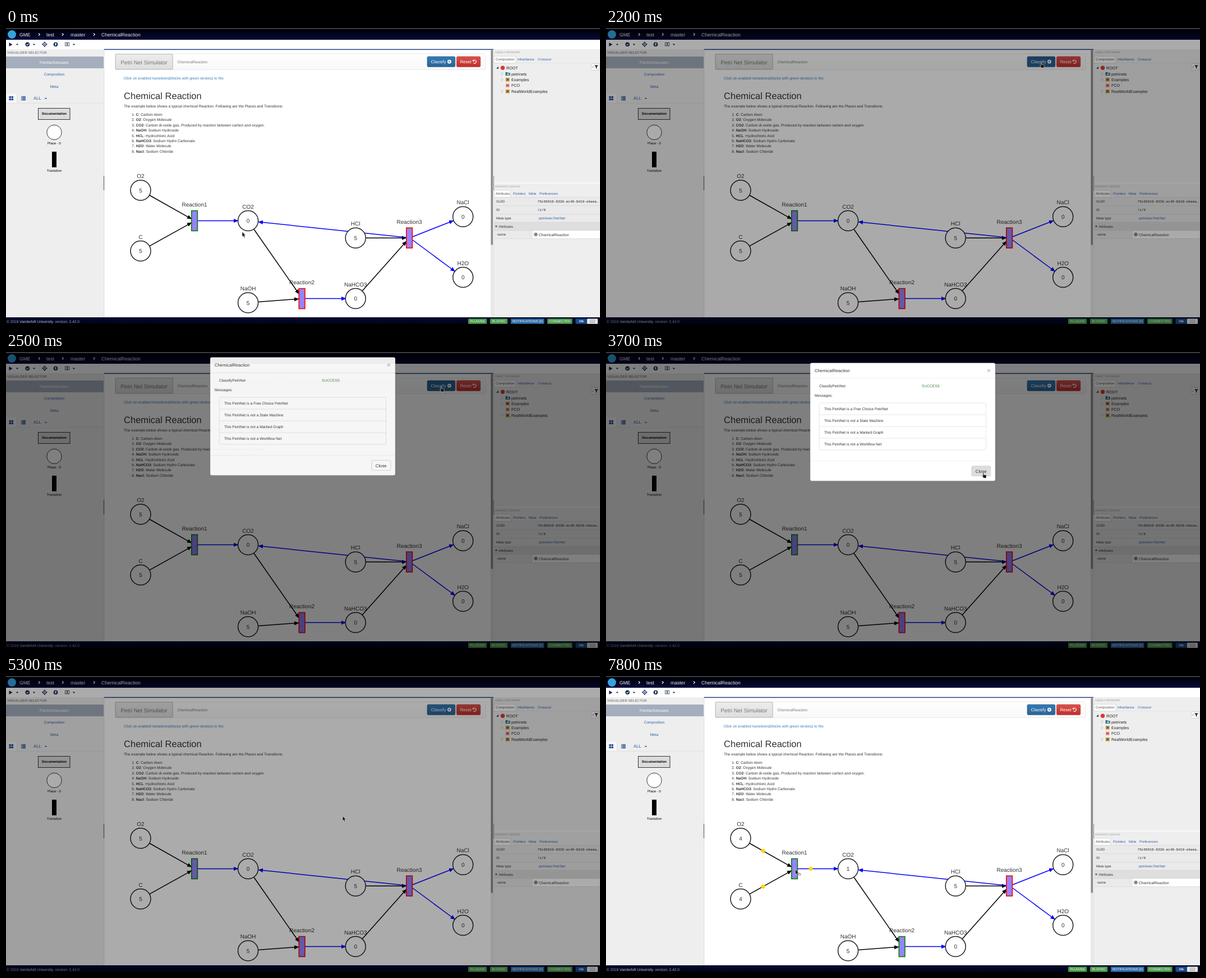
These frames come from a looping animation (1059 by 529 pixels, 8000 ms). An HTML page:

```html
<!DOCTYPE html>
<html lang="en">
<head>
<meta charset="utf-8">
<title>Petri net simulator</title>
<style>
html, body { margin: 0; width: 100%; height: 100%; overflow: hidden; background: #fff; }
svg { display: block; font-family: "Liberation Sans", Arial, sans-serif; text-rendering: geometricPrecision; }
text { white-space: pre; }
</style>
</head>
<body>
<svg id="stage" width="1059" height="529" viewBox="0 0 1059 529"></svg>
<script>
const BASE = 6.62, SMALL = 6.07, MID = 7.72, TREE = 7.17, BIG = 8.6, LABEL = 10;
const NAVY = '#0c2556', LINK = '#2f5fa8', TEXT = '#333';

// y is the middle of the capitals
const text = (x, y, s, size = BASE, fill = TEXT, extra = '') =>
  `<text x="${x}" y="${y + size * .35}" font-size="${size}" fill="${fill}" ${extra}>${s}</text>`;
const mid = (x, y, s, size, fill, extra = '') =>
  text(x, y, s, size, fill, 'text-anchor="middle" ' + extra);
const rect = (x, y, w, h, fill, extra = '') =>
  `<rect x="${x}" y="${y}" width="${w}" height="${h}" fill="${fill}" ${extra}/>`;
const circle = (x, y, r, fill, extra = '') =>
  `<circle cx="${x}" cy="${y}" r="${r}" fill="${fill}" ${extra}/>`;
const path = (d, fill, extra = '') => `<path d="${d}" fill="${fill}" ${extra}/>`;
const stroke = (d, color, width = 1) => path(d, 'none', `stroke="${color}" stroke-width="${width}"`);
const caret = (x, y, color = NAVY) => path(`M${x - 2.2} ${y - 1}h4.4l-2.2 2.4z`, color);
const bold = 'font-weight="bold"';

const gradient = (id, a, b) =>
  `<linearGradient id="${id}" x2="0" y2="1"><stop stop-color="${a}"/><stop offset="1" stop-color="${b}"/></linearGradient>`;
const marker = (id, color) =>
  `<marker id="${id}" markerUnits="userSpaceOnUse" markerWidth="9" markerHeight="8" refX="8" refY="4" orient="auto"><path d="M0 .4L8.4 4L0 7.6z" fill="${color}"/></marker>`;

const defs = '<defs>' + gradient('bar', '#000', '#05093a') + gradient('foot', '#05082f', '#000418') +
  gradient('blue', '#337ab7', '#2a6496') + gradient('red', '#d9534f', '#c12e2a') +
  gradient('brand', '#ececec', '#dedede') + gradient('nav', '#fff', '#f8f8f8') +
  marker('black', '#000') + marker('blueTip', '#00f') + '</defs>';

function header() {
  let s = rect(0, 0, 1059, 21, 'url(#bar)') + rect(0, 0, 1059, 2, '#373c3e') + circle(10.5, 11.5, 7.5, '#35a4dc');
  [[24, 'GME'], [72, 'test'], [115, 'master'], [170, 'ChemicalReaction']]
    .forEach(([x, w]) => s += text(x, 11.5, w, BIG, '#eee'));
  [58, 100, 156].forEach(x => s += stroke(`M${x} 9.3l2.3 2.3l-2.3 2.3`, '#fff', 1.2));
  s += path('M5.5 26v7l6-3.5z', NAVY) + circle(38.3, 29.2, 3.8, NAVY) +
    stroke('M36.3 29.2l1.5 1.6l2.6-3', '#fff', 1.1) +
    path('M68.8 25l1.7 2.4l2.4 1.7l-2.4 1.7l-1.7 2.4l-1.7-2.4l-2.4-1.7l2.4-1.7z', 'none', `stroke="${NAVY}" stroke-width="1.2"`) +
    circle(68.8, 29.1, 1, NAVY) + circle(88.5, 29.2, 3.8, NAVY) +
    path('M88.5 26.6l2.3 2.6h-1.5v2.2h-1.6v-2.2h-1.5z', '#fff') +
    stroke('M105.5 26h3v6h-3zM109.7 26h3v6h-3z', '#39445c', .9);
  [20, 50, 121].forEach(x => s += caret(x, 29.5));
  [30, 60, 79, 99].forEach(x => s += rect(x - 1.5, 23, .6, 13, '#eee'));
  return s;
}

function sidebar() {
  let s = rect(0, 38, 174, 479, '#eee') + text(2, 44.2, 'VISUALIZER SELECTOR', SMALL, '#888', bold) +
    rect(0, 51, 174, 21, '#a5aebd') + mid(86, 61.3, 'PetriNetSimulator', BASE, '#fff') +
    mid(86, 83, 'Composition', BASE, LINK) + mid(86, 104.5, 'Meta', BASE, LINK) +
    rect(0, 117, 19, 17, '#f6f6f6') + rect(19, 117, .6, 17, '#ddd') + rect(0, 134, 174, .6, '#ddd');
  for (const x of [5.5, 9.6]) for (const y of [122, 126]) s += rect(x, y, 3.4, 3.2, '#1d4a94');
  for (let i = 0; i < 4; i++) s += rect(27, 122 + i * 2, 1.4, 1.3, '#1d4a94') + rect(29, 122 + i * 2, 6, 1.3, '#1d4a94');
  return s + text(49, 125.7, 'ALL', MID, LINK) + caret(71, 126, LINK) +
    rect(57.5, 143.5, 56.5, 20, '#dcdcdc', 'stroke="#333"') + mid(86, 153.3, 'Documentation', SMALL, '#000', bold) +
    circle(86, 186.5, 13.2, '#fff', 'stroke="#222" stroke-width=".9"') + mid(86, 206.3, 'Place - 0', SMALL, '#000') +
    rect(82, 221, 8, 28, '#000') + mid(86, 255, 'Transition', SMALL, '#000');
}

function content() {
  const items = ['C: Carbon Atom', 'O2: Oxygen Molecule', 'CO2: Carbon di-oxide gas, Produced by reaction between carbon and oxygen.',
    'NaOH: Sodium Hydroxide', 'HCL: Hydrochloric Acid', 'NaHCO3: Sodium Hydro Carbonate', 'H2O: Water Molecule', 'Nacl: Sodium Chloride'];
  let s = rect(174, 38, 696, 479, '#e4e4e4') + rect(175.5, 38, 693, 479, '#fff') + rect(175, 37.6, 694, 1.5, '#1f4584') +
    rect(864, 39, 5, 478, '#e8e8e8') + rect(864.6, 39.5, 3.4, 348, '#8b8b8b') +
    rect(173.7, 264, 1.6, 26, '#888') + rect(869, 264, 1.6, 26, '#888') +
    rect(195, 46.5, 660, 28, 'url(#nav)', 'rx="2" stroke="#e3e3e3" stroke-width=".7"') +
    rect(195.2, 46.7, 102, 27.2, 'url(#brand)', 'stroke="#aaa" stroke-width=".8" rx="1"') +
    text(204.5, 61.2, 'Petri Net Simulator', 9.93, '#777') + text(305.5, 60.2, 'ChemicalReaction', BASE, '#777') +
    rect(751, 51, 49.8, 18.4, 'url(#blue)', 'id="classify" rx="2" stroke="#245580" stroke-width=".6"') +
    text(757.5, 60.2, 'Classify', MID, '#fff') + circle(790.4, 60.2, 3.4, '#fff') + path('M789.4 58.3v3.8l2.7-1.9z', '#2d6ca2') +
    rect(803.4, 51, 42.4, 18.4, 'url(#red)', 'rx="2" stroke="#b92c28" stroke-width=".6"') +
    text(809.5, 60.2, 'Reset', MID, '#fff') + stroke('M833.2 58.3a2.9 2.9 0 1 1 .2 4.2', '#fff', 1.1) + path('M832 56.6v3.2h3.1z', '#fff') +
    text(210, 90, 'Click on enabled transitions(blocks with green strokes) to fire.', BASE, '#337ab7') +
    text(210, 121, 'Chemical Reaction', 16.55) +
    text(210, 139.8, 'The example below shows a typical chemical Reaction. Following are the Places and Transitions:');
  items.forEach((item, i) => {
    const [name, rest] = item.split(':'), y = 154.6 + i * 9.41;
    s += text(229.8, y, i + 1 + '.', BASE, TEXT, 'text-anchor="end"') +
      text(231.8, y, `<tspan ${bold}>${name}</tspan>:${rest}`);
  });
  return s;
}

const places = [['O2', 240, 290], ['C', 240, 398.5], ['CO2', 431.6, 344.5], ['NaOH', 431.6, 491],
  ['HCl', 623.2, 375.2], ['NaHCO3', 623.2, 483.6], ['NaCl', 814.7, 337.2], ['H2O', 814.7, 445.6]];
const bars = [[336, 344.5], [527.5, 483.6], [719, 375.2]];
const links = [[256, 299, 331, 341.3], [256, 389.7, 331, 347.8], [342, 344.5, 414, 344.5, 1],
  [442, 359.7, 522.5, 475.5], [450, 489.6, 522, 484.2], [533, 483.6, 606, 483.6, 1],
  [641, 375.2, 714, 375.2], [635, 470, 714, 381], [713, 374.3, 450, 346.5, 1],
  [725, 373, 798, 344.2, 1], [725, 379, 800.5, 435, 1]];

function net() {
  let s = '';
  bars.forEach(([x, y], i) => s += mid(x, y - 29, 'Reaction' + (i + 1), LABEL));
  places.forEach(([name, x, y]) => s += mid(x, y - 25.5, name, LABEL));
  links.forEach(([a, b, c, d, out]) => s += `<line x1="${a}" y1="${b}" x2="${c}" y2="${d}" stroke="${out ? '#00f' : '#000'}" stroke-width="1.5" marker-end="url(#${out ? 'blueTip' : 'black'})"/>`);
  places.forEach(([name, x, y]) => s += circle(x, y, 18, '#fff', 'stroke="#222" stroke-width="1.5"') +
    mid(x, y, '', LABEL, TEXT, `id="n${name}"`));
  bars.forEach(([x, y], i) => s += rect(x - 5.2, y - 18, 10.6, 36, '#9683fb', `id="bar${i}" stroke-width="1.6"`));
  s += '<g id="tokens">';
  links.slice(0, 3).forEach(([a, b, c, d]) => s += circle(a + (c - a) * .32, b + (d - b) * .32, 3.6, '#ffd700'));
  return s + '</g>';
}

function inspector() {
  const tabs = (y, list) => rect(870, y - 6, list[0][2], 12.5, '#fff', 'stroke="#ccc" stroke-width=".7"') +
    list.map(([x, w], i) => text(x, y, w, SMALL, i ? LINK : '#555')).join('');
  const icon = (y, a, b) => rect(890.5, y - 3.5, 7.5, 7, a) + path(`M892 ${y - 2}l4.5 4M896.5 ${y - 2}l-4.5 4`, 'none', `stroke="${b}" stroke-width="1.5"`);
  let s = rect(870, 38, 189, 479, '#eee') + text(872, 43.8, 'OBJECT BROWSER', 4.74, '#999') +
    tabs(56.3, [[873, 'Composition', 39], [912, 'Inheritance'], [948, 'Crosscut']]) + rect(870, 62.5, 189, .6, '#ddd') +
    path('M878 68.8v4h-4z', '#333') + circle(885.5, 71.2, 3.7, '#d83a30') + text(892, 71.3, 'ROOT', TREE, '#222');
  [[82, 'petrinets'], [92.3, 'Examples'], [102.7, 'FCO'], [113.3, 'RealWorldExamples']].forEach(([y, w], i) => {
    s += text(901, y, w, TREE, '#222');
    if (i != 2) s += path(`M883.5 ${y - 2.5}v5l3-2.5z`, '#fff', 'stroke="#aaa" stroke-width=".6"');
  });
  s += path('M890.5 79h3l1 1h4.2v5h-8.2z', '#3b6c80') + rect(893, 81.3, 4, 2.6, '#9bd9ea') +
    icon(92.3, '#e5b93c', '#45437c') + icon(102.7, '#f1c5c5', '#cf2a2a') + icon(113.3, '#e5b93c', '#45437c') +
    rect(1043.5, 63.5, 14.5, 12, '#fafafa', 'rx="2" stroke="#bbb" stroke-width=".6"') +
    stroke('M1047.4 68l-1.6 1.7l1.6 1.7', '#555', .7) + path('M1049 66.5h7l-2.6 3v3.5l-1.7-1.2v-2.3z', '#222') +
    rect(870, 276, 189, 1.8, '#fafafa') + text(872, 283.7, 'PROPERTY EDITOR', 4.74, '#999') +
    tabs(296, [[873, 'Attributes', 30], [904, 'Pointers'], [932, 'Meta'], [951, 'Preferences']]);
  s += rect(870, 302.5, 189, 74, '#eaeaea') + rect(870, 347, 189, 14.7, '#dedede') + rect(939, 362, 119.5, 14, '#fff');
  for (let i = 0; i < 6; i++) s += rect(870, 302.5 + i * 14.8, 189, .6, '#d2d2d2');
  const mono = 'font-family="Liberation Mono, monospace"';
  return s + text(874, 309.8, 'GUID', SMALL) + text(874, 324.7, 'ID', SMALL) + text(874, 339.5, 'Meta type', SMALL) +
    caret(874, 354.5, '#333') + text(878.5, 354.5, 'Attributes', SMALL) + text(876, 369.3, 'name', SMALL) +
    text(947.5, 309.8, '75c65018-8336-ec40-8d10-ebaea…', SMALL, '#222', mono) + text(947.5, 324.7, '/z/6', SMALL, '#222', mono) +
    text(950, 339.5, 'petrinets.PetriNet', SMALL, LINK) + text(950, 369.3, 'ChemicalReaction') +
    circle(944.5, 369, 2.7, 'none', 'stroke="#222" stroke-width=".9"') + circle(944.5, 369, 1.2, '#222');
}

function footer() {
  let s = rect(0, 517, 1059, 12, 'url(#foot)') +
    text(1, 525, '© 2018 <tspan fill="#c3c7d4">Vanderbilt University</tspan>', BASE, '#969aa8') +
    text(87.5, 525, 'version: 2.42.0', BASE, '#a5aab8');
  [[824, 33.2, 'PLUGINS'], [863, 31.2, 'IN SYNC'], [900, 59.5, 'NOTIFICATIONS [0]', '#2c6ca6'], [965, 44.6, 'CONNECTED']]
    .forEach(([x, w, label, fill = '#4a9c4a']) =>
      s += rect(x, 519.5, w, 9.2, fill, 'rx="1.2"') + mid(x + w / 2, 524, label, 6, '#fff'));
  return s + rect(1015.5, 519.5, 20.5, 9.2, '#174a8c', 'rx="1"') + mid(1025.5, 524.2, 'ON', 5.5, '#fff', bold) +
    rect(1036, 519.5, 19, 9.2, '#e6e6e6', 'rx="1"') + stroke('M1041.5 522h8v4.6h-8zM1043 524.5h5', '#888', .7);
}

function dialog() {
  const kinds = ['a Free Choice PetriNet', 'not a State Machine', 'not a Marked Graph', 'not a Workflow Net'];
  let s = rect(364, 19.5, 330, 211, '#fff', 'rx="3" stroke="#555" stroke-opacity=".4" stroke-width=".6"') +
    text(372, 33.2, 'ChemicalReaction', MID) + mid(682.5, 32.7, '×', 11.6, '#bbb', bold) +
    rect(364, 46.3, 330, .6, '#e8e8e8') + rect(364, 194.7, 330, .6, '#e8e8e8') +
    text(380, 60.3, 'ClassifyPetriNet') + text(563, 60.3, 'SUCCESS', BASE, '#3c863d') + text(372, 77.3, 'Messages:') +
    rect(380.2, 91, 297.3, 84, '#fff', 'rx="2" stroke="#ddd" stroke-width=".7"');
  kinds.forEach((kind, i) => {
    if (i) s += rect(380.2, 90.7 + i * 21, 297.3, .7, '#ddd');
    s += text(389, 101.2 + i * 21, 'This PetriNet is ' + kind);
  });
  return s + rect(651.8, 203.7, 34, 18, '#fff', 'id="close" rx="2" stroke-width=".8"') + mid(668.7, 213, 'Close', MID);
}

const pointer = path('M0 0v9.2l2-1.8l1.5 3.3l1.6-.8l-1.4-3.1h2.6z', '#111', 'id="arrow" stroke="#fff" stroke-width=".6"') +
  path('M.4 .8q.8-.9 1.6 0v3l4 .8q.9.3.8 1.2l-.7 4h-4.1l-2.8-3.6q-.2-1 .9-.8l.5.5z', '#111', 'id="hand" stroke="#fff" stroke-width=".5"') +
  `<g id="busy">${circle(7.2, 9.2, 2.2, '#ddd', 'stroke="#666" stroke-width=".8" stroke-dasharray="10 3.8"')}</g>`;

stage.innerHTML = defs + rect(0, 0, 1059, 529, '#fff') + header() + sidebar() + content() + net() + inspector() + footer() +
  rect(0, 2, 1059, 527, '#000', 'id="shade"') + `<g id="modal">${dialog()}</g><g id="cursor">${pointer}</g>`;

const $ = id => document.getElementById(id);
const set = (id, name, value) => $(id).setAttribute(name, value);
const show = (id, on) => set(id, 'visibility', on ? 'visible' : 'hidden');
const ramp = (t, a, b) => Math.min(1, Math.max(0, (t - a) / (b - a)));

// start, end, x, y of each pointer move
const moves = [[100, 300, 330, 190], [300, 500, 238, 115], [500, 700, 227, 206], [800, 1200, 480, 170],
  [1200, 1500, 760, 88], [1500, 1700, 769, 59], [1700, 1900, 774.5, 61.5], [3600, 3700, 671.5, 215.5],
  [5200, 5300, 600, 250], [5400, 5500, 461.5, 316.5], [5600, 5700, 331, 317], [5800, 5900, 332, 346],
  [6000, 6100, 333, 347], [6300, 6400, 331, 339], [6800, 6900, 330, 339], [7000, 7100, 331, 348], [7200, 7300, 337.5, 345.5]];
// time, opacity and lift of the dialog
const poses = [[0, 0, 0], [2400, .5, -28], [2500, .93, -10], [3700, 1, 0], [5100, .89, -5], [5300, 0, 0]];

function draw(now) {
  const t = Math.floor(now % 8000 / 100) * 100;
  let x = 421, y = 364;
  for (const [a, b, toX, toY] of moves) {
    const k = ramp(t, a, b);
    x += (toX - x) * k;
    y += (toY - y) * k;
  }
  const hand = t >= 1700 && t < 5300, fired = t >= 7800;
  set('cursor', 'transform', `translate(${x} ${y})`);
  show('arrow', !hand);
  show('hand', hand);
  show('busy', t >= 7300);
  set('busy', 'transform', `rotate(${t >= 7600 ? 140 : 0} 7.2 9.2)`);

  set('classify', 'fill', t >= 1700 && t < 3700 ? '#286090' : 'url(#blue)');
  set('shade', 'opacity', t < 5300 ? .5 * ramp(t, 2000, 2300) : t < 5500 ? .33 : 0);
  const [, opacity, lift] = poses.filter(p => p[0] <= t).pop();
  set('modal', 'opacity', opacity);
  set('modal', 'transform', `translate(0 ${lift})`);
  set('close', 'fill', t >= 3700 ? '#dcdcdc' : '#fff');
  set('close', 'stroke', t >= 5100 ? '#6f93b8' : t >= 3700 ? '#d4d4d4' : '#ccc');

  const counts = fired ? [4, 4, 1, 5, 5, 0, 0, 0] : [5, 5, 0, 5, 5, 0, 0, 0];
  places.forEach(([name], i) => $('n' + name).textContent = counts[i]);
  bars.forEach((_, i) => set('bar' + i, 'stroke', i == 0 || i == 1 && fired ? '#087f08' : '#f00'));
  show('tokens', fired);
}

const start = performance.now();
function loop() {
  draw(performance.now() - start);
  requestAnimationFrame(loop);
}
loop();
</script>
</body>
</html>
```
